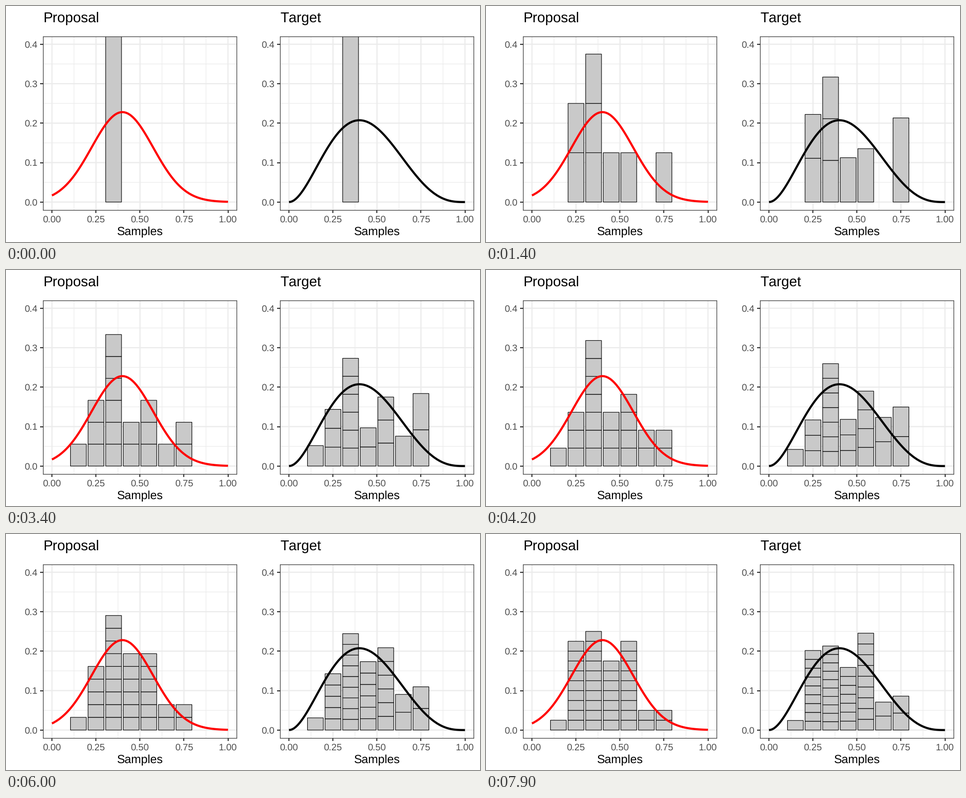
Animation, 960 px wide and 480 px high, one loop 8000 ms. Source, as a matplotlib script:

```python
import numpy as np
import matplotlib.pyplot as plt
from matplotlib.animation import FuncAnimation
from matplotlib.patches import Rectangle

W, H, DPI = 960, 480, 100
PX = 72 / DPI                      # points per pixel
LEFT, RIGHT, TOP, BOTTOM = 75.3, 467.4, 61.7, 414.8
INK, GRID, LABEL = "#333333", "#EBEBEB", "#4D4D4D"

plt.rcParams["font.family"] = "Liberation Sans"
plt.rcParams["text.hinting"] = "none"
plt.rcParams["text.kerning_factor"] = 6   # effectively no kerning

# First decimal of each sample, in the order drawn.
DRAWS = np.array([int(c) for c in "3237342552735313465364435432524252254325"])
BIN, HALF = 0.1, 0.045


def proposal(x, mean=0.4, sd=0.175):
    return np.exp(-((x - mean) / sd) ** 2 / 2) / (sd * np.sqrt(2 * np.pi))


def target(x):
    return 60 * x ** 2 * (1 - x) ** 3   # Beta(3, 4)


edges = (DRAWS + 1) * BIN
flat = np.ones(len(DRAWS))
importance = target(edges) / proposal(edges)

fig = plt.figure(figsize=(W / DPI, H / DPI), dpi=DPI, facecolor="white")


def label(x, y, text, size, **kw):
    fig.text(x / W, 1 - y / H, text, fontsize=size * PX, va="baseline", **kw)


def draw_grid(ax, xs, ys, width, zorder):
    style = dict(color=GRID, lw=width * PX, zorder=zorder, snap=False)
    for x in xs:
        ax.axvline(x, **style)
    for y in ys:
        ax.axhline(y, **style)


def make_panel(dx, title, density, color):
    ax = fig.add_axes([(LEFT + dx) / W, 1 - BOTTOM / H,
                       (RIGHT - LEFT) / W, (BOTTOM - TOP) / H])
    ax.set(xlim=(-0.05, 1.05), ylim=(-0.02, 0.42))
    xticks, yticks = np.arange(5) / 4, np.arange(5) / 10
    ax.set_xticks(xticks)
    ax.set_yticks(yticks)
    ax.tick_params(length=6 * PX, width=2.2 * PX, color=INK,
                   labelbottom=False, labelleft=False)
    for spine in ax.spines.values():
        spine.set(color=INK, linewidth=1.2 * PX)

    draw_grid(ax, xticks[:-1] + 0.125, yticks[:-1] + 0.05, 1.16, 0.5)
    draw_grid(ax, xticks, yticks, 2.33, 0.6)

    x = np.linspace(0, 1, 101)
    ax.plot(x, density(x) * BIN, color=color, lw=4.27 * PX, zorder=2.2,
            solid_capstyle="butt")

    label(LEFT + dx, 32.8, title, 28.8)
    label((LEFT + RIGHT) / 2 + dx, 466.3, "Samples", 24, ha="center")
    for v in xticks:
        px = LEFT + dx + (v + 0.05) / 1.1 * (RIGHT - LEFT)
        label(px, 439.8, f"{v:.2f}", 19.2, ha="center", color=LABEL)
    for v in yticks:
        py = BOTTOM - (v + 0.02) / 0.44 * (BOTTOM - TOP)
        label(64.3 + dx, py + 6.8, f"{v:.1f}", 19.2, ha="right", color=LABEL)

    return [ax.add_patch(Rectangle((d * BIN + 0.05 - HALF, 0), 2 * HALF, 0,
                                   facecolor="#C9C9C9", edgecolor="black",
                                   linewidth=1.15 * PX, zorder=1.5,
                                   snap=False))
            for d in DRAWS]


panels = [(make_panel(0, "Proposal", proposal, "red"), flat),
          (make_panel(480, "Target", target, "black"), importance)]


def update(i):
    n = i + 1
    for bars, weights in panels:
        heights = weights[:n] / weights[:n].sum()
        tops = np.zeros(10)
        for k, bar in enumerate(bars):
            bar.set_visible(k < n)
            if k < n:
                d = DRAWS[k]
                bar.set_y(tops[d])
                bar.set_height(heights[k])
                tops[d] += heights[k]
    return [bar for bars, _ in panels for bar in bars]


anim = FuncAnimation(fig, update, frames=len(DRAWS), interval=200,
                     init_func=lambda: update(0), repeat=True, repeat_delay=0)
plt.show()
```
